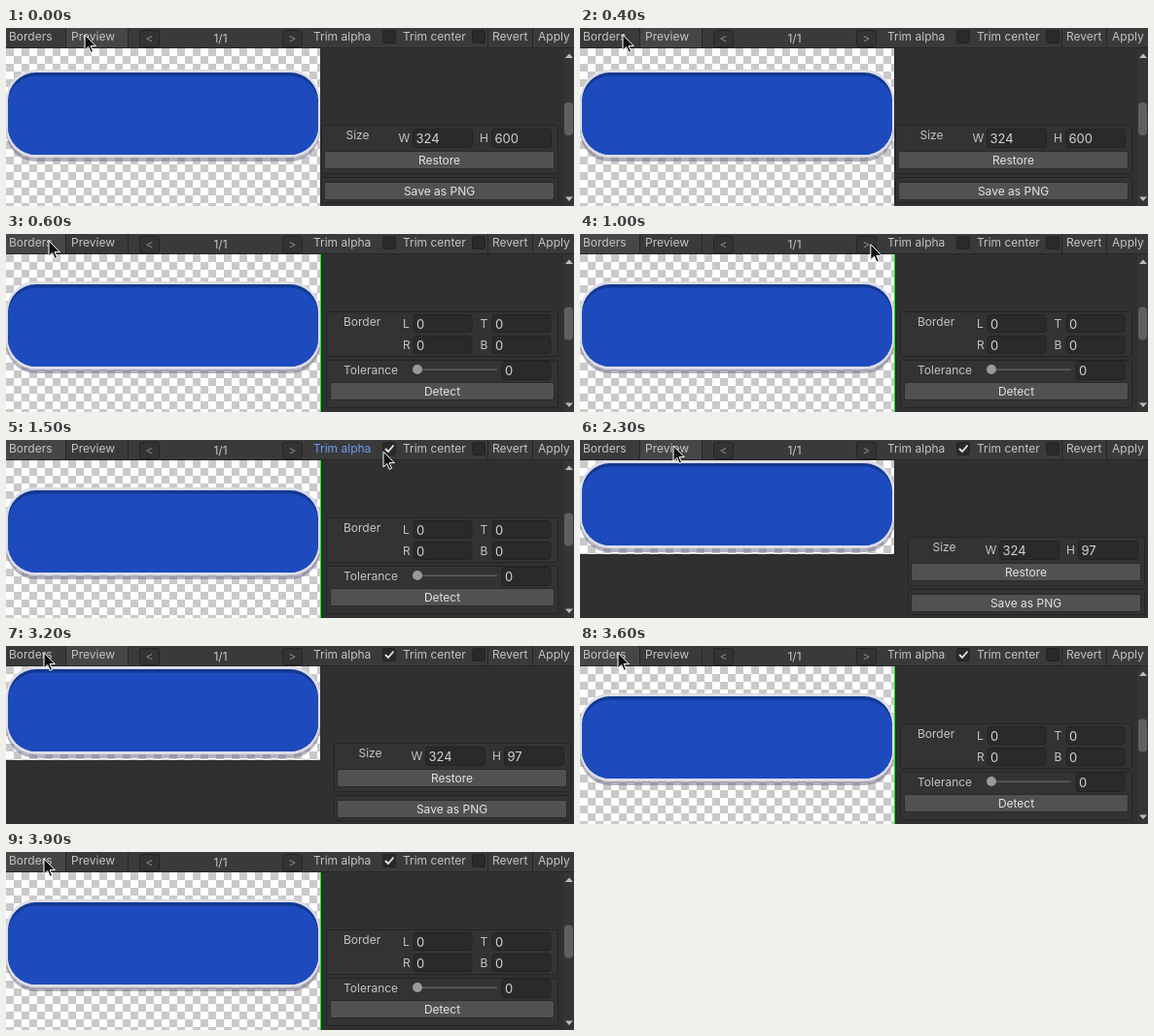
Write an HTML page that moves like this. It is 584 by 184 pixels and loops after 4 s.

```html
<!DOCTYPE html>
<html lang="en">
<head>
<meta charset="utf-8">
<title>Sprite border editor</title>
<style>
  html, body { margin: 0; width: 100%; height: 100%; overflow: hidden; background: #303030; }
  svg { display: block; width: 584px; height: 184px; font: 12px Inter, sans-serif; }
  text { fill: #c4c4c4; white-space: pre; }
  .mid { text-anchor: middle; }
  .bright { fill: #e4e4e4; }
  .num { font-size: 13px; fill: #d2d2d2; }
  .dim { fill: #8a8a8a; }
  .field { fill: #2a2a2a; stroke: #222; }
  .group { fill: #333; stroke: #242424; }
  .push { fill: #515151; stroke: #292929; }
  .active { fill: #464646; }
  .focus { fill: #6f9cf0; }
</style>
</head>
<body>
<svg id="stage" viewBox="0 0 584 184">
  <defs>
    <pattern id="checker" width="16" height="16" y="21" patternUnits="userSpaceOnUse">
      <path fill="#c9c9c9" d="M0 0H16V16H0Z"/>
      <path fill="#fff" d="M8 0H16V8H8ZM0 8H8V16H0Z"/>
    </pattern>
    <clipPath id="face"><rect x="2" y="3" width="319" height="85" rx="29"/></clipPath>
  </defs>
</svg>
<script>
const LOOP = 4000, STEP = 100;
const svg = document.getElementById('stage');

function add(parent, tag, attrs = {}, text = '') {
  const el = document.createElementNS('http://www.w3.org/2000/svg', tag);
  for (const key in attrs) el.setAttribute(key, attrs[key]);
  el.textContent = text;
  parent.append(el);
  return el;
}
const group = (parent = svg) => add(parent, 'g');
const label = (g, x, y, text, cls = '') => add(g, 'text', { x, y, class: cls }, text);
const fill = (g, x, y, width, height, color) => add(g, 'rect', { x, y, width, height, fill: color });
const box = (g, x, y, w, h, cls, rx = 2) =>
  add(g, 'rect', { x: x + .5, y: y + .5, width: w - 1, height: h - 1, rx, class: cls });

function field(g, x, y, w, h, value) {
  box(g, x, y, w, h, 'field', 3);
  return label(g, x + 3.5, y + h / 2 + 5, value, 'num');
}
function push(g, x, y, w, h, text) {
  box(g, x, y, w, h, 'push');
  label(g, x + w / 2, y + h / 2 + 4, text, 'mid bright');
}

// Left pane: checkerboard and sprite
const board = fill(svg, 0, 21, 323, 163, 'url(#checker)');
const sprite = group();
const pill = (y, h, color, opacity = 1) =>
  add(sprite, 'rect', { x: 0, y, width: 323, height: h, rx: 31, fill: color, opacity });
pill(4, 91, '#77748a', .55);
pill(0, 91, '#dcdde7');
const face = add(sprite, 'g', { 'clip-path': 'url(#face)' });
fill(face, 0, 0, 323, 90, '#123992');
add(face, 'rect', { x: 2, y: 6.5, width: 319, height: 90, rx: 29, fill: '#1d4bbd' });
const guide = fill(svg, 323, 21, 1, 163, '#0f0');

// Scroll bar
const scroll = group();
fill(scroll, 573, 21, 11, 163, '#353535');
const thumb = add(scroll, 'rect', { x: 574, y: 77, width: 9, height: 34, rx: 4, fill: '#5f5f5f' });
add(scroll, 'path', { d: 'M575 31L579 26.5L583 31ZM575 174.500H583L579 179Z', fill: '#bdbdbd' });

// Size panel
const size = group();
box(size, 324, 100, 244, 51, 'group');
box(size, 324, 154, 244, 27, 'group');
label(size, 349.5, 115, 'Size');
label(size, 403.5, 117.5, 'W');
label(size, 487, 117.5, 'H');
field(size, 418, 104, 62, 20, '324');
const high = field(size, 499, 104, 62, 20, '600');
push(size, 327, 127, 237, 19, 'Restore');
push(size, 327, 159, 237, 19, 'Save as PNG');

// Border panel
const border = group();
box(border, 329, 80, 239, 47, 'group');
box(border, 329, 130, 239, 50, 'group');
label(border, 347, 95, 'Border');
[['L', 'T', 83], ['R', 'B', 105]].forEach(([a, b, y]) => {
  label(border, 408, y + 14, a);
  label(border, 487.5, y + 14, b);
  field(border, 418.5, y, 61, 19, '0');
  field(border, 499.5, y, 61, 19, '0');
});
label(border, 347, 145, 'Tolerance');
fill(border, 423, 139.500, 82, 1.5, '#5e5e5e');
add(border, 'circle', { cx: 423, cy: 140, r: 5, fill: '#999' });
field(border, 509.5, 131, 51, 20, '0');
push(border, 333, 153, 231, 19, 'Detect');

// Toolbar
const bar = group();
fill(bar, 0, 0, 584, 21, '#3a3a3a');
const bordersTab = add(bar, 'rect', { width: 61, height: 20, class: 'active' });
const previewTab = add(bar, 'rect', { x: 62, width: 63, height: 20, class: 'active' });
[61, 125, 495, 541].forEach(x => fill(bar, x, 0, 1, 20, '#262626'));
fill(bar, 0, 20, 584, 1, '#262626');
[[137, '<'], [284, '>']].forEach(([x, sign]) => {
  box(bar, x, 2, 21, 18, 'group');
  label(bar, x + 10.5, 14.5, sign, 'mid dim');
});
label(bar, 3, 13, 'Borders');
label(bar, 67, 13, 'Preview');
label(bar, 220.5, 14.5, '1/1', 'mid');
const trim = label(bar, 316, 13, 'Trim alpha');
label(bar, 408, 13, 'Trim center');
label(bar, 500, 13, 'Revert');
label(bar, 547, 13, 'Apply');
[387, 479].forEach(x => box(bar, x, 2, 14, 14, 'field'));
const tick = add(bar, 'path', {
  d: 'M390 9L393 12L398.500 5.500', fill: 'none', stroke: '#e8e8e8', 'stroke-width': 1.8
});

const cursor = add(svg, 'path', {
  d: 'M0 0V16L3.700 12.500L6.200 18.300L8.600 17.300L6.100 11.600H11.300Z',
  fill: '#111', stroke: '#fff', 'stroke-width': 1
});

// Pointer moves: start, end, target x, target y
const moves = [
  [0, 400, 44, 7],
  [600, 1200, 388, 12],
  [1700, 2200, 96, 6],
  [2700, 3200, 39, 7]
];
const ease = p => p * p * (3 - 2 * p);

function pointer(t) {
  let x = 81, y = 7;
  for (const [from, to, tx, ty] of moves) {
    const k = ease(Math.min(1, Math.max(0, (t - from) / (to - from))));
    x += (tx - x) * k;
    y += (ty - y) * k;
  }
  return `translate(${x} ${y})`;
}
const show = (el, on) => el.setAttribute('visibility', on ? 'visible' : 'hidden');

function draw(time) {
  const t = Math.floor(time % LOOP / STEP) * STEP;
  const trimmed = t >= 2300 && t < 3600;
  const preview = t < 600 || trimmed;
  const checked = t >= 1400;

  board.setAttribute('height', trimmed ? 97 : 163);
  sprite.setAttribute('transform', `translate(0 ${trimmed ? 21 : preview ? 43 : 49})`);
  show(guide, !preview);
  show(scroll, !trimmed);
  thumb.setAttribute('y', preview ? 77 : 75.5);

  show(size, preview);
  size.setAttribute('transform', `translate(${trimmed ? 13 : 0} 0)`);
  high.textContent = trimmed ? '97' : '600';
  show(border, !preview);

  show(bordersTab, !preview);
  show(previewTab, preview);
  show(tick, checked);
  trim.setAttribute('class', checked && t < 2200 ? 'focus' : '');
  cursor.setAttribute('transform', pointer(t));
}

function frame() {
  draw(performance.now());
  requestAnimationFrame(frame);
}
frame();
</script>
</body>
</html>
```
